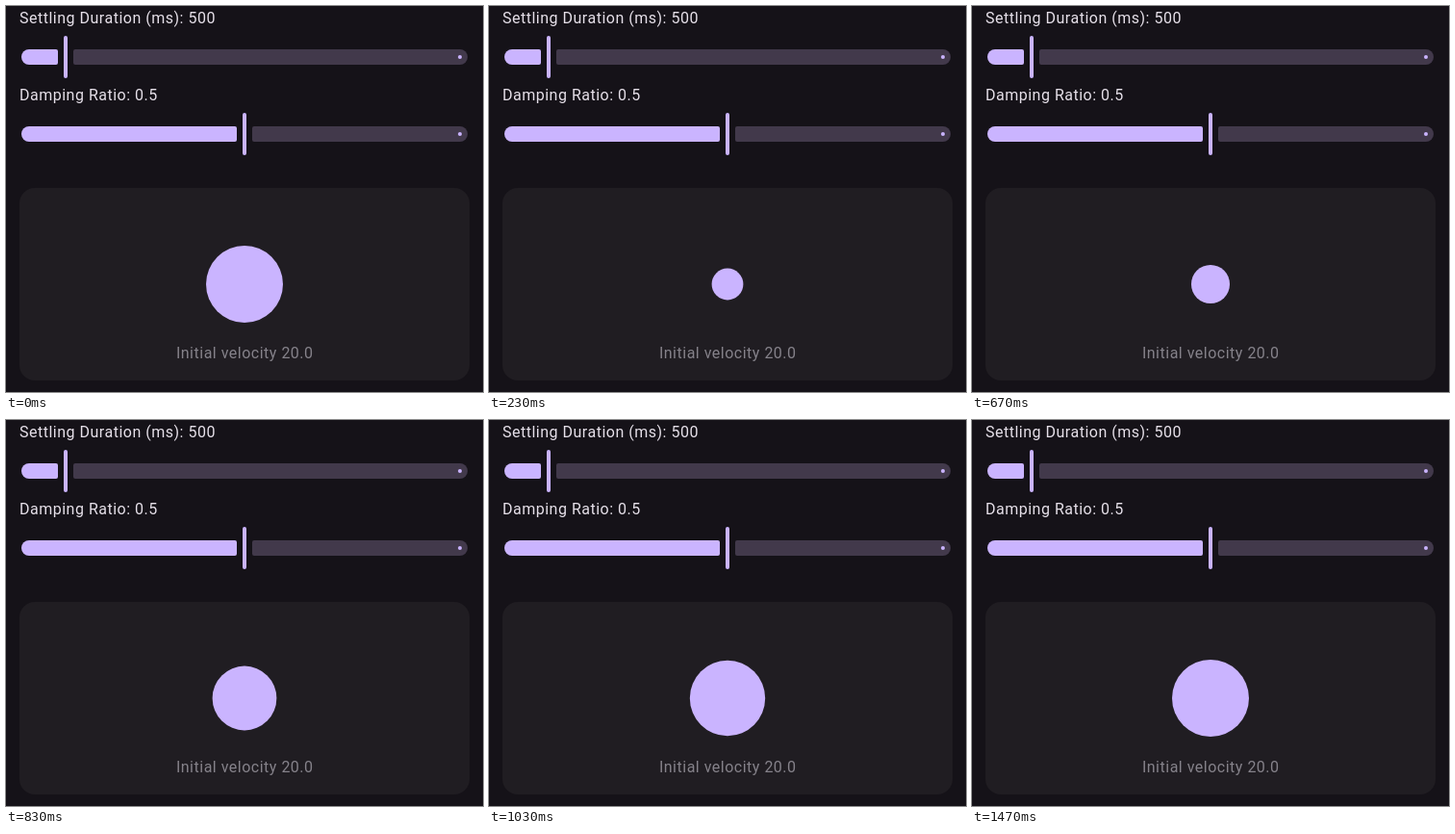
Animation of 496 by 401 pixels, one loop 1.5 s. Source, as an HTML page:

```html
<!DOCTYPE html>
<html lang="en">
<head>
<meta charset="utf-8">
<title>Spring settling</title>
<style>
  html, body { margin: 0; width: 100%; height: 100%; overflow: hidden; background: #151218; }
  svg { display: block; }
  text { font: 400 16px Roboto, sans-serif; letter-spacing: .5px; fill: #e6e0e9; }
  .accent { fill: #cab4ff; }
  .track { fill: #42394b; }
  .hint { fill: #85828a; }
</style>
</head>
<body>
<svg width="496" height="401" viewBox="0 0 496 401">
  <text x="14" y="18">Settling Duration (ms): 500</text>
  <g>
    <path class="accent" d="M24 45H52a2 2 0 0 1 2 2V59a2 2 0 0 1-2 2H24a8 8 0 0 1 0-16Z"/>
    <path class="track" d="M72 45H472a8 8 0 0 1 0 16H72a2 2 0 0 1-2-2V47a2 2 0 0 1 2-2Z"/>
    <rect class="accent" x="60" y="31" width="4" height="44" rx="2"/>
    <circle class="accent" cx="472" cy="53" r="2"/>
  </g>
  <text x="14" y="98">Damping Ratio: 0.5</text>
  <g transform="translate(0 80)">
    <path class="accent" d="M24 45H238a2 2 0 0 1 2 2V59a2 2 0 0 1-2 2H24a8 8 0 0 1 0-16Z"/>
    <path class="track" d="M258 45H472a8 8 0 0 1 0 16H258a2 2 0 0 1-2-2V47a2 2 0 0 1 2-2Z"/>
    <rect class="accent" x="246" y="31" width="4" height="44" rx="2"/>
    <circle class="accent" cx="472" cy="53" r="2"/>
  </g>
  <rect x="14" y="189" width="468" height="200" rx="16" fill="#201d22"/>
  <circle id="ball" class="accent" cx="248" cy="289" r="40"/>
  <text class="hint" x="248.25" y="366" text-anchor="middle">Initial velocity 20.0</text>
</svg>
<script>
  const LOOP = 1500, STEP = 100 / 3;
  const SHRINK = 94, GROW = 730;
  const BIG = 40, SMALL = 20;
  const OMEGA = 25.6, DAMPING = 0.5, VELOCITY = -866;
  const ball = document.getElementById('ball');

  // Underdamped spring, ms seconds after release towards its target.
  function spring(from, to, ms) {
    const t = ms / 1000, decay = OMEGA * DAMPING;
    const freq = OMEGA * Math.sqrt(1 - DAMPING * DAMPING);
    const offset = from - to;
    const swing = (VELOCITY + decay * offset) / freq;
    return to + Math.exp(-decay * t) *
      (offset * Math.cos(freq * t) + swing * Math.sin(freq * t));
  }

  function radius(t) {
    if (t < SHRINK) return BIG;
    if (t < GROW) return spring(BIG, SMALL, t - SHRINK);
    return spring(SMALL, BIG, t - GROW);
  }

  // The picture advances at 30 steps per second.
  function draw() {
    const t = performance.now() % LOOP;
    const tick = Math.floor((t + 4) / STEP) * STEP % LOOP;
    ball.setAttribute('r', radius(tick).toFixed(2));
    requestAnimationFrame(draw);
  }
  draw();
</script>
</body>
</html>
```
